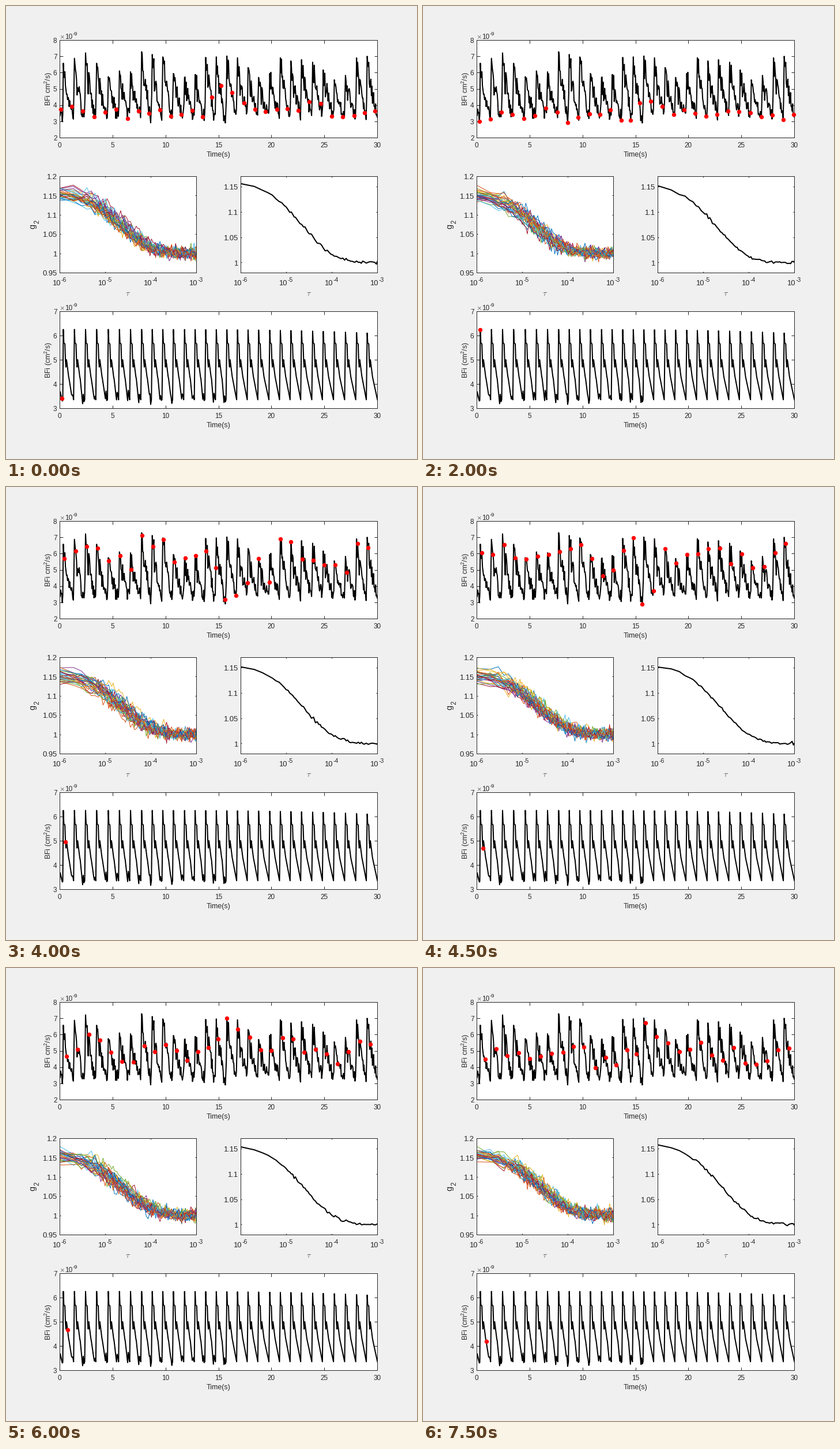
These frames come from a looping animation (713x785 px, 8000 ms). A matplotlib script:

```python
import numpy as np
import matplotlib.pyplot as plt
from matplotlib.animation import FuncAnimation

W, H, DPI = 713, 785, 64
PX = 72 / DPI                      # points per pixel
LEFT, RIGHT = 93, 644
INK = "#262626"
COLORS = ["#0072bd", "#d95319", "#edb120", "#7e2f8e", "#77ac30", "#4dbeee", "#a2142f"]
STEP = 0.05                        # seconds between samples
SAMPLES = np.arange(601)
BEATS = np.arange(30)
TRACES = 30

plt.rcParams.update({
    "font.family": "Liberation Sans",
    "mathtext.fontset": "custom",
    "mathtext.rm": "Liberation Sans",
    "mathtext.default": "regular",
})
fig = plt.figure(figsize=(W / DPI, H / DPI), dpi=DPI, facecolor="#f0f0f0")


# ---- layout helpers, all in pixels from the top left ----

def write(x, y, text, size=11.8, ha="center", color=INK, **kw):
    """Text whose digits are vertically centred on y."""
    fig.text(x / W, 1 - (y + 0.36 * size) / H, text, fontsize=size * PX,
             ha=ha, va="baseline", color=color, **kw)


def write_up(x, y, text, size):
    fig.text(x / W, 1 - y / H, text, fontsize=size * PX, color=INK, rotation=90,
             rotation_mode="anchor", ha="center", va="baseline")


def power(x, y, exponent, size):
    write(x, y, "10", size, "right")
    write(x + 0.5, y - 5, f"-{exponent}", size * 0.8, "left")


def panel(x0, y0, x1, y1, xlim, ylim, xticks, yticks, tick, size):
    ax = fig.add_axes([x0 / W, 1 - y1 / H, (x1 - x0) / W, (y1 - y0) / H])
    ax.set(xlim=xlim, ylim=ylim, xticks=xticks, yticks=yticks)
    ax.tick_params(direction="in", top=True, right=True, length=tick * PX, width=PX,
                   color=INK, labelleft=False, labelbottom=False)
    for spine in ax.spines.values():
        spine.set(linewidth=PX, color=INK)
    for v in yticks:
        y = y1 - (v - ylim[0]) / (ylim[1] - ylim[0]) * (y1 - y0)
        write(x0 - 4.5, y + 0.5, f"{v:g}", size, "right")
    return ax


def time_panel(y0, y1, ylim, label):
    ax = panel(LEFT, y0, RIGHT, y1, (0, 30), ylim, range(0, 31, 5),
               range(ylim[0], ylim[1] + 1), 5.5, 11.8)
    for t in range(0, 31, 5):
        write(LEFT + t * (RIGHT - LEFT) / 30, y1 + 12.5, str(t))
    write(369, y1 + 28.5, "Time(s)", 12.4)
    write_up(78, (y0 + y1) / 2 + 0.5, label, 12.4)
    write(LEFT, y0 - 6, "×", 13, "left", "#777777")
    power(115.5, y0 - 6.5, 9, 11.8)
    return ax


def lag_panel(x0, x1, ylim, yticks):
    ax = panel(x0, 295, x1, 462, (-6, -3), ylim, range(-6, -2), yticks, 2.4, 13)
    for k in range(4):
        power(x0 + 2 + k * (x1 - x0) / 3, 479, 6 - k, 13)
    write((x0 + x1) / 2, 497, r"$\mathit{\tau}$", 14, color="#555555",
          math_fontfamily="cm")
    return ax


# ---- flow signals ----

# beat timing drifts slowly, so a few anchors (beat, sample) are enough
PEAKS = np.rint(np.interp(BEATS, [0, 7, 22, 29], [7, 155, 457, 602]))
STARTS = np.rint(np.interp(BEATS, [0, 7, 13, 15, 17, 22, 27, 29],
                           [2, 149, 270, 305, 348, 451, 556, 596])).astype(int)


def clean_flow(rng):
    """One averaged pulse shape per beat; only the early feet are ragged."""
    pulse_x = np.array([0, 1, 3, 4, 5, 6, 7, 10, 11])
    pulse_y = [5.7, 5.65, 4.96, 4.7, 5.0, 4.84, 4.31, 4.2]
    x, y = [0, 1, 3, 5, 6], [3.35, 3.68, 3.5, 3.3, 3.32]
    for beat, (peak, after) in enumerate(zip(PEAKS, PEAKS[1:])):
        x += [*(peak + pulse_x)]
        y += [6.25 - 0.15 * (beat / 28) ** 4, *pulse_y]
        if beat < 15:
            x += [after - 5.5, after - 4.3, after - 3]
            y += [*([3.4, 3.55, 3.35] + rng.uniform(-0.25, 0.2, 3))]
        x.append(after - 1.6)
        y.append(3.35)
    return np.array(x), np.array(y)


def noisy_flow(rng, x, y):
    """The clean pulses with a swelling height and sample noise."""
    base = np.interp(SAMPLES, x, y)
    height = 6.4 + 0.65 * np.cos(2 * np.pi * (BEATS - 1) / 6.75) + rng.uniform(-0.35, 0.45, 30)
    beat = np.clip(np.searchsorted(PEAKS - 2, SAMPLES, "right") - 1, 0, 29)
    flow = 3.35 + (base - 3.35) * (height[beat] - 3.35) / 2.9
    noise = rng.uniform(-0.55, 0.5, SAMPLES.size) * flow / 4.8
    noise[PEAKS[PEAKS <= 600].astype(int)] = 0
    return np.maximum(flow + noise, 2.9)


# ---- correlation curves ----

LAG = np.concatenate([np.arange(1, 17)] +
                     [16 * 2**k + 2 * 2**k * np.arange(1, 9) for k in range(6)]).astype(float)
LOG_LAG = np.log10(LAG) - 6


def correlations(step):
    """Noisy decays; they fall fastest while the flow is at its peak."""
    rng = np.random.default_rng(100 + step)
    contrast = 0.16 + 0.005 * ((step - 7) / 7) ** 4
    decay = 10 + 0.11 * step - 2.4 * np.exp(-((step - 4) / 2) ** 2)
    gain = rng.normal(0, 0.05, (TRACES, 1))
    rate = rng.normal(0, 0.2, (TRACES, 1))
    scale = decay * np.exp(rate - rate.mean())
    shape = np.exp(1 - np.sqrt(1 + LAG / scale))
    spread = np.interp(LOG_LAG, [-6, -5.3, -3], [0.005, 0.0075, 0.0085])
    return 1 + contrast * (1 + gain - gain.mean()) * shape + spread * rng.normal(size=shape.shape)


# ---- scene ----

rng = np.random.default_rng(4)
clean_x, clean_y = clean_flow(rng)
flow = noisy_flow(rng, clean_x, clean_y)

top = time_panel(59, 228, (2, 8), "BFi cm$^2$/s)")
bottom = time_panel(529, 697, (3, 7), "BFi (cm$^2$/s)")
left = lag_panel(LEFT, 330, (0.95, 1.2), [0.95, 1, 1.05, 1.1, 1.15, 1.2])
right = lag_panel(407, RIGHT, (0.98, 1.1705), [1, 1.05, 1.1, 1.15])
write_up(50, 381.5, "g", 14.5)
write_up(57, 374, "2", 11.5)

thick = dict(color="black", linewidth=2 * PX, solid_joinstyle="round")
dot = dict(marker="o", color="red", linestyle="", markersize=7.4 * PX,
           markeredgewidth=0, clip_on=False, zorder=5)
top.plot(SAMPLES * STEP, flow, **thick)
bottom.plot(clean_x * STEP, clean_y, **thick)
traces = [left.plot([], [], color=COLORS[i % 7], linewidth=PX)[0] for i in range(TRACES)]
mean_line, = right.plot([], [], **thick)
beat_dots, = top.plot([], [], **dot)
phase_dot, = bottom.plot([], [], **dot)


def draw(frame):
    step = max(0, frame - 1)       # the first pose is held twice as long
    at = STARTS + step
    at = at[at <= 600]
    beat_dots.set_data(at * STEP, flow[at])
    phase = 4 + step
    phase_dot.set_data([phase * STEP], [np.interp(phase, clean_x, clean_y)])
    curves = correlations(step)
    for line, curve in zip(traces, curves):
        line.set_data(LOG_LAG, curve)
    mean_line.set_data(LOG_LAG, curves.mean(axis=0))
    return [*traces, mean_line, beat_dots, phase_dot]


animation = FuncAnimation(fig, draw, frames=16, interval=500, repeat=True, repeat_delay=0)
plt.show()
```
